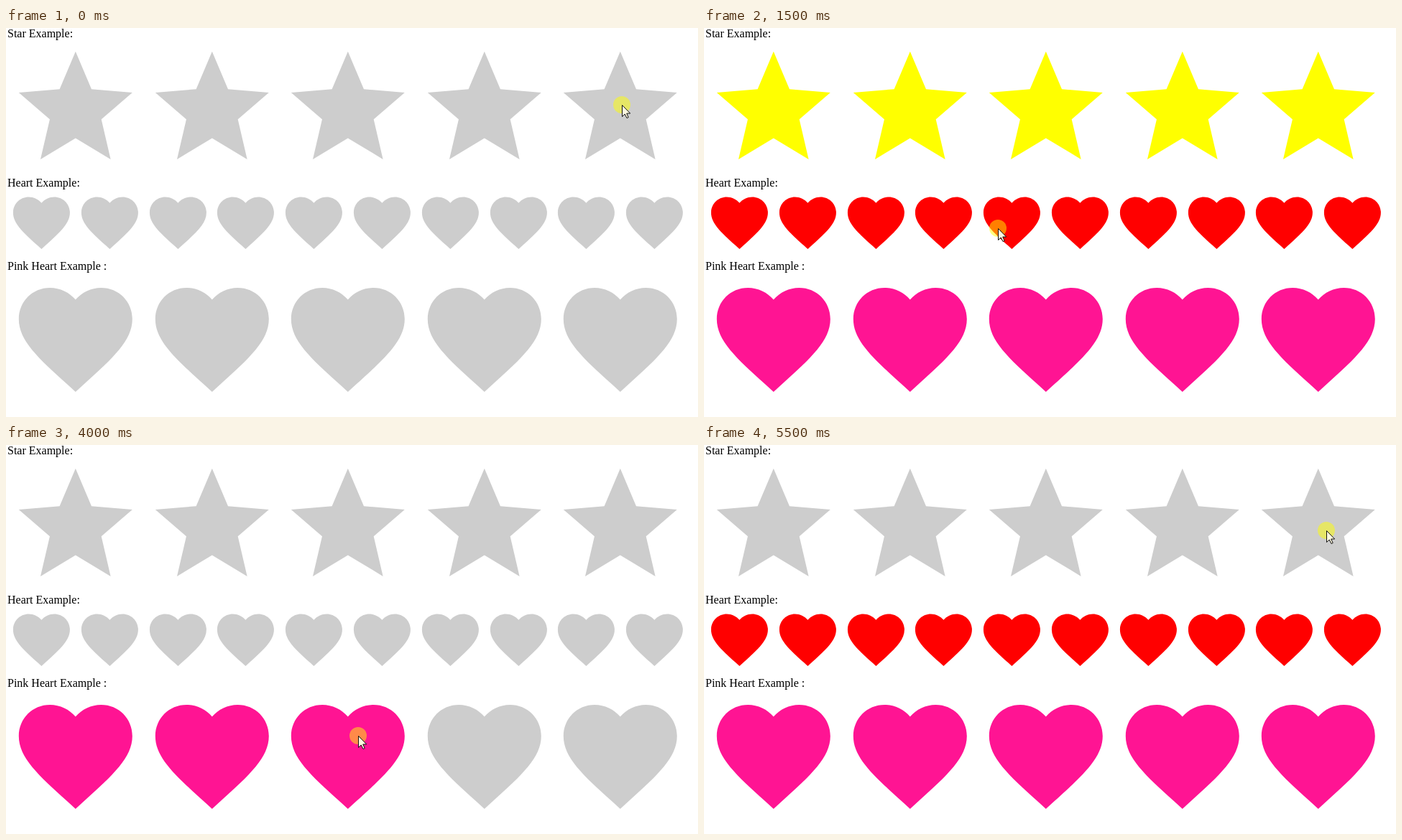
These frames come from a looping animation (963 px wide and 542 px high, 6 s). An HTML page:

```html
<!DOCTYPE html>
<html lang="en">
<head>
<meta charset="utf-8">
<title>Rating examples</title>
<style>
  html, body { margin: 0; width: 100%; height: 100%; overflow: hidden; background: #fff; }
  svg { display: block; }
  text { font: 16px "Liberation Serif", "Times New Roman", serif; }
</style>
</head>
<body>
<svg width="963" height="542" viewBox="0 0 963 542">
  <text x="2" y="13">Star Example:</text>
  <text x="2" y="221">Heart Example:</text>
  <text x="2" y="337">Pink Heart Example :</text>
  <g id="icons"></g>
  <g id="pointer">
    <circle id="glow" r="12" fill="#ff0" fill-opacity=".5"/>
    <path d="M.5.5V16.5L4.2 13 7 18.5 9.2 17.5 6.7 12H11.7Z" fill="#fffae0" stroke="#111"/>
  </g>
</svg>
<script>
const STAR = "M12 17.27L18.18 21l-1.64-7.03L22 9.24l-7.19-.61L12 2 9.19 8.63 2 9.24l5.46 4.73L5.82 21z";
const HEART = "M12 21.35l-1.45-1.32C5.4 15.36 2 12.28 2 8.5 2 5.42 4.42 3 7.5 3c1.74 0 3.41.81 4.5 2.09" +
  "C13.09 3.81 14.76 3 16.5 3 19.58 3 22 5.42 22 8.5c0 3.78-3.4 6.86-8.55 11.54L12 21.35z";
const GREY = "#cdcdcd", LEFT = 2, WIDTH = 948, STEP = 500;

const $ = id => document.getElementById(id);

function makeRow(shape, color, count, top) {
  const size = WIDTH / count;
  const icons = Array.from({ length: count }, (_, i) => {
    const icon = document.createElementNS("http://www.w3.org/2000/svg", "path");
    icon.setAttribute("d", shape);
    icon.setAttribute("transform", `translate(${Math.round(LEFT + i * size)} ${top}) scale(${size / 24})`);
    return $("icons").appendChild(icon);
  });
  return {
    top,
    rating: 0,
    click(x) {
      const picked = Math.ceil((x - LEFT) / size);
      this.rating = picked === this.rating ? 0 : picked; // same icon again clears the row
    },
    paint() {
      icons.forEach((icon, i) => icon.setAttribute("fill", i < this.rating ? color : GREY));
    }
  };
}

const rows = [
  makeRow(STAR, "#ff0", 5, 17),
  makeRow(HEART, "#f00", 10, 223.7),
  makeRow(HEART, "#ff1493", 5, 338.3)
];

// where the pointer clicks, one spot per step
const clicks = [
  [857, 107], [895, 276], [868, 433], [409, 279], [440, 135], [489, 412],
  [454, 130], [430, 259], [490, 405], [845, 407], [895, 240], [866, 119]
];
const NO_GLOW = 6;

// replays all clicks made before step n
function show(n) {
  rows.forEach(row => row.rating = 0);
  for (const [x, y] of clicks.slice(0, n)) rows.findLast(row => y > row.top).click(x);
  rows.forEach(row => row.paint());
  $("pointer").setAttribute("transform", `translate(${clicks[n]})`);
  $("glow").setAttribute("visibility", n === NO_GLOW ? "hidden" : "visible");
}

show(0);
const start = performance.now();
requestAnimationFrame(function tick() {
  show(Math.floor((performance.now() - start) / STEP) % clicks.length);
  requestAnimationFrame(tick);
});
</script>
</body>
</html>
```
